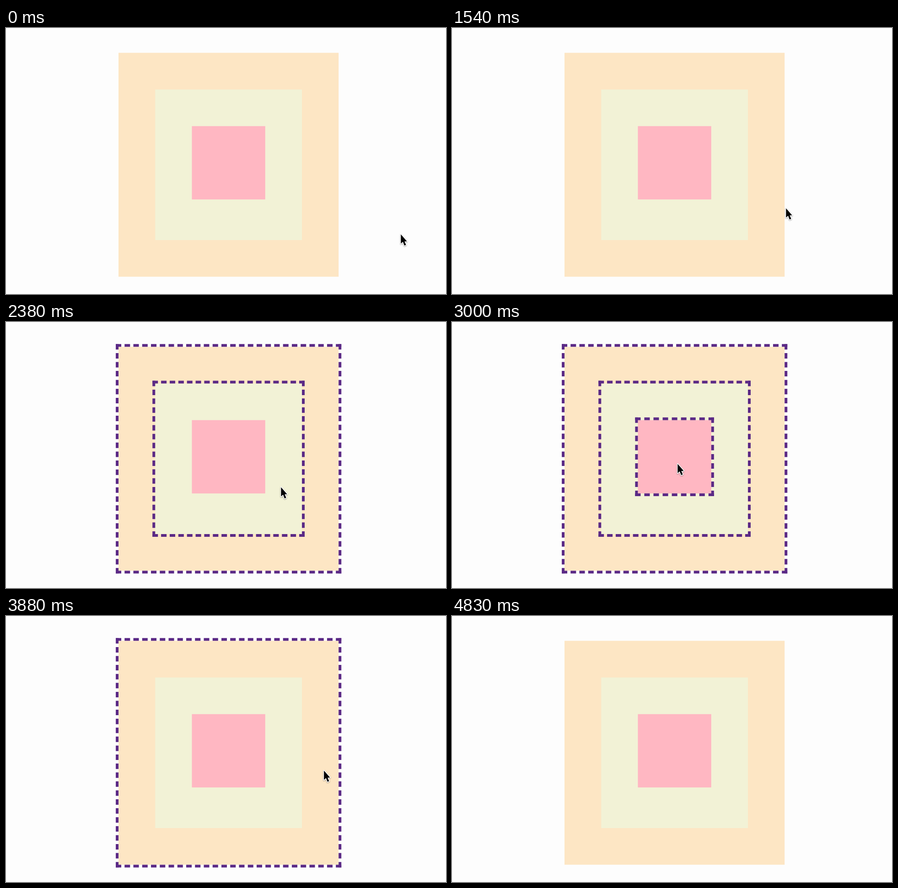
These frames come from a looping animation (962 px wide and 582 px high, 5540 ms). An HTML page:

```html
<!DOCTYPE html>
<html lang="en">
<head>
<meta charset="utf-8">
<title>Nested hover</title>
<style>
  html, body { margin: 0; width: 100%; height: 100%; overflow: hidden; background: #fdfdfd; }
  svg { display: block; width: 962px; height: 582px; }
  .ring { stroke: #5b2a86; stroke-width: 6; fill: none; visibility: hidden; }
  .ring.on { visibility: visible; }
  #cursor { filter: drop-shadow(0.6px 1.6px 1.1px rgba(0, 0, 0, .38)); }
  #cursor path { fill: #000; stroke: #fff; stroke-width: 3; stroke-linejoin: round; paint-order: stroke; }
</style>
</head>
<body>
<svg viewBox="0 0 962 582">
  <g id="boxes"></g>
  <g id="cursor"><path d="M.3 .6V20.8L4.8 16.8L8 25L11.6 23.5L8.3 15.9L13.6 15.7Z"/></g>
</svg>
<script>
  const LOOP = 5540, START = 830, FPS = 24, GONE = 96;
  const LEFT = 246, TOP = 54.3, SIZE = 481.2, PAD = 80.2, LINE_GAP = 8.7;
  const EDGE = 6, DASH = 12, PITCH = 19;

  const layer = document.getElementById('boxes');
  const cursor = document.getElementById('cursor');

  function add(name, attrs, parent) {
    const el = document.createElementNS('http://www.w3.org/2000/svg', name);
    for (const key in attrs) el.setAttribute(key, attrs[key]);
    return parent.appendChild(el);
  }

  // One side of a ring, with a whole dash at both ends
  function addSide(ring, x, y, dir, len) {
    const count = Math.round(len / PITCH);
    const gap = (len - DASH * count) / (count - 1);
    add('path', { d: `M${x} ${y}${dir}${len}`, 'stroke-dasharray': `${DASH} ${gap}` }, ring);
  }

  function addRing({ x, y, width, height }) {
    const ring = add('g', { class: 'ring' }, layer);
    const half = EDGE / 2, w = width + 2 * EDGE, h = height + 2 * EDGE;
    for (const sy of [y - half, y + height + half]) addSide(ring, x - EDGE, sy, 'h', w);
    for (const sx of [x - half, x + width + half]) addSide(ring, sx, y - EDGE, 'v', h);
    return ring;
  }

  const boxes = ['#fde6c4', '#f2f2d6', '#ffb7c2'].map((fill, i) => {
    const width = SIZE - 2 * PAD * i;
    const height = width + (i < 2 ? LINE_GAP : 0);
    const box = { x: LEFT + PAD * i, y: TOP + PAD * i, width, height };
    add('rect', { ...box, fill }, layer);
    return { ...box, ring: addRing(box) };
  });

  const power = n => u => u ** n;
  const linear = power(1);
  const smooth = u => u * u * (3 - 2 * u);

  // Pointer legs: last step, end point, easing for x and (if different) y
  const legs = [
    { end: -1, x: 863, y: 451 },
    { end: 17, x: 730, y: 394, ease: power(1.2) },
    { end: 37, x: 601, y: 361, ease: linear },
    { end: 52, x: 493, y: 310, ease: linear },
    { end: 58, x: 485, y: 307, ease: linear },
    { end: 82, x: 792, y: 352, ease: smooth },
    { end: 90, x: 792, y: 352, ease: linear },
    { end: 95, x: 862, y: 24, ease: power(3), easeY: power(1.6) }
  ];

  function pointAt(step) {
    const i = legs.findIndex(leg => step <= leg.end);
    if (i === 0) return legs[0];
    const a = legs[i - 1], b = legs[i];
    const u = (step - a.end) / (b.end - a.end);
    const easeY = b.easeY || b.ease;
    return { x: a.x + (b.x - a.x) * b.ease(u), y: a.y + (b.y - a.y) * easeY(u) };
  }

  function draw(now) {
    const t = Math.floor((now % LOOP) / 10) * 10;
    const step = Math.floor((t - START) * FPS / 1000 + 1e-6);
    const shown = step < GONE;
    const { x, y } = shown ? pointAt(step) : { x: -99, y: -99 };
    cursor.setAttribute('visibility', shown ? 'visible' : 'hidden');
    cursor.setAttribute('transform', `translate(${x} ${y})`);

    for (const b of boxes) {
      const over = x >= b.x && x < b.x + b.width && y >= b.y && y < b.y + b.height;
      b.ring.classList.toggle('on', over);
    }
  }

  const begin = performance.now();
  function tick() {
    draw(performance.now() - begin);
    requestAnimationFrame(tick);
  }
  tick();
</script>
</body>
</html>
```
